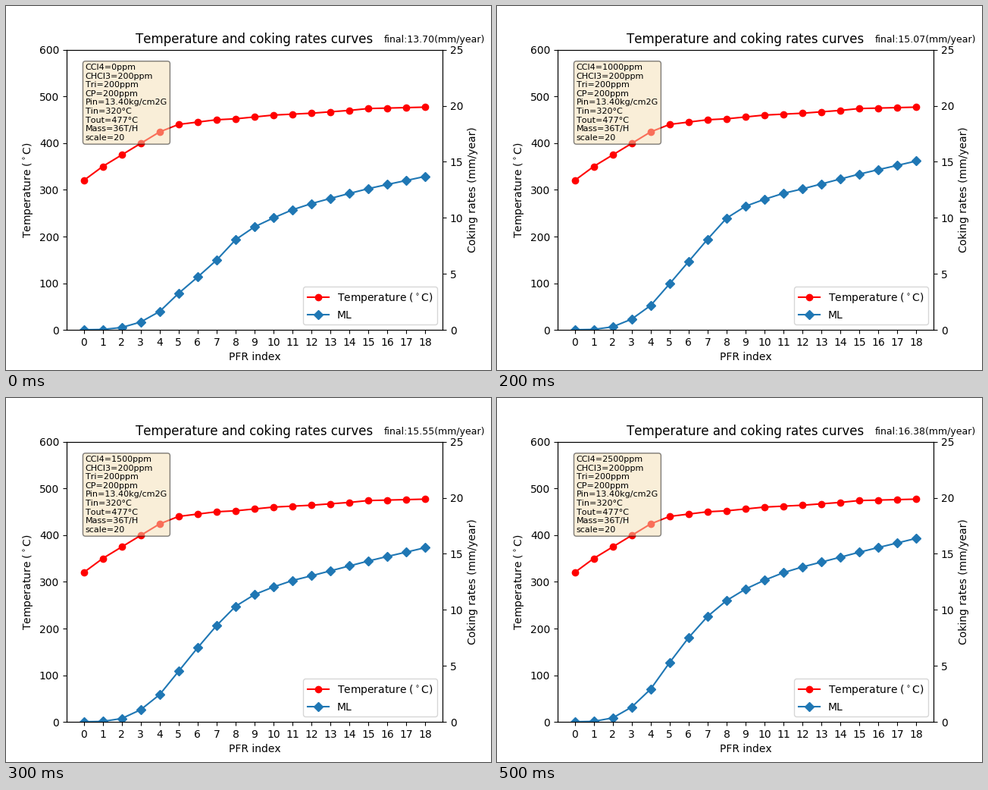
A matplotlib script for the animation above (0.6 s loop, 640 by 480 pixels).

```python
import matplotlib.pyplot as plt
import numpy as np
from matplotlib.animation import FuncAnimation

plt.rcParams["text.kerning_factor"] = 6

CCL4_STEP = 500
FINAL_RATES = [13.70, 14.51, 15.07, 15.55, 16.02, 16.38]

# Key points of the coking curve at the lowest and the highest CCl4 level.
KEYS = [0, 2, 4, 5, 7, 8, 10, 14, 18]
LOW = [.02, .22, 1.65, 3.27, 6.23, 8.05, 10.00, 12.18, FINAL_RATES[0]]
HIGH = [.02, .36, 2.93, 5.30, 9.42, 10.83, 12.65, 14.70, FINAL_RATES[-1]]

CONDITIONS = "\n".join([
    "CCl4={ccl4}ppm", "CHCl3=200ppm", "Tri=200ppm", "CP=200ppm",
    "Pin=13.40kg/cm2G", "Tin=320°C", "Tout=477°C", "Mass=36T/H", "scale=20",
])


def smooth(x, keys, values):
    """Cubic Hermite curve through the key points."""
    keys, values = np.array(keys), np.array(values)
    slopes = np.gradient(values, keys)
    i = np.clip(np.searchsorted(keys, x, side="right") - 1, 0, len(keys) - 2)
    width = keys[i + 1] - keys[i]
    t = (x - keys[i]) / width
    rise = t * t * (3 - 2 * t)
    return (values[i] * (1 - rise) + values[i + 1] * rise
            + width * t * (1 - t) * (slopes[i] * (1 - t) - slopes[i + 1] * t))


index = np.arange(19)
temperature = np.interp(index, [0, 1, 4, 5, 7, 8, 10, 12, 14, 15, 18],
                        [320, 350, 424, 440, 450, 452, 460, 464, 470, 474, 477])
low, high = smooth(index, KEYS, LOW), smooth(index, KEYS, HIGH)
# The middle of the reactor responds to CCl4 sooner than its inlet.
response = np.interp(index, [5, 8, 9, 12], [1.3, .55, .55, 1])


def coking(final):
    growth = (final - FINAL_RATES[0]) / (FINAL_RATES[-1] - FINAL_RATES[0])
    return low + (high - low) * growth ** response


fig, ax = plt.subplots(figsize=(6.4, 4.8), dpi=100)
rate_ax = ax.twinx()

temp_line, = ax.plot(index, temperature, "r-o", label=r"Temperature ($^\circ$C)")
rate_line, = rate_ax.plot(index, low, "C0-D", label="ML")

ax.set_title("Temperature and coking rates curves")
ax.set_xlabel("PFR index")
ax.set_ylabel(r"Temperature ($^\circ$C)")
rate_ax.set_ylabel("Coking rates (mm/year)")
ax.set_xticks(index)
ax.set_xlim(-0.9, 18.9)
ax.set_ylim(0, 600)
rate_ax.set_ylim(0, 25)
rate_ax.legend(handles=[temp_line, rate_line], loc="lower right")

conditions = ax.text(0.05, 0.95, "", transform=ax.transAxes, fontsize=8, va="top",
                     bbox=dict(boxstyle="round", facecolor="wheat", alpha=0.5))
final_rate = ax.text(0.845, 1.025, "", transform=ax.transAxes, fontsize=9)


def update(step):
    final = FINAL_RATES[step]
    rate_line.set_ydata(coking(final))
    conditions.set_text(CONDITIONS.format(ccl4=step * CCL4_STEP))
    final_rate.set_text(f"final:{final:.2f}(mm/year)")
    return rate_line, conditions, final_rate


anim = FuncAnimation(fig, update, frames=len(FINAL_RATES), interval=100, repeat=True)
plt.show()
```
